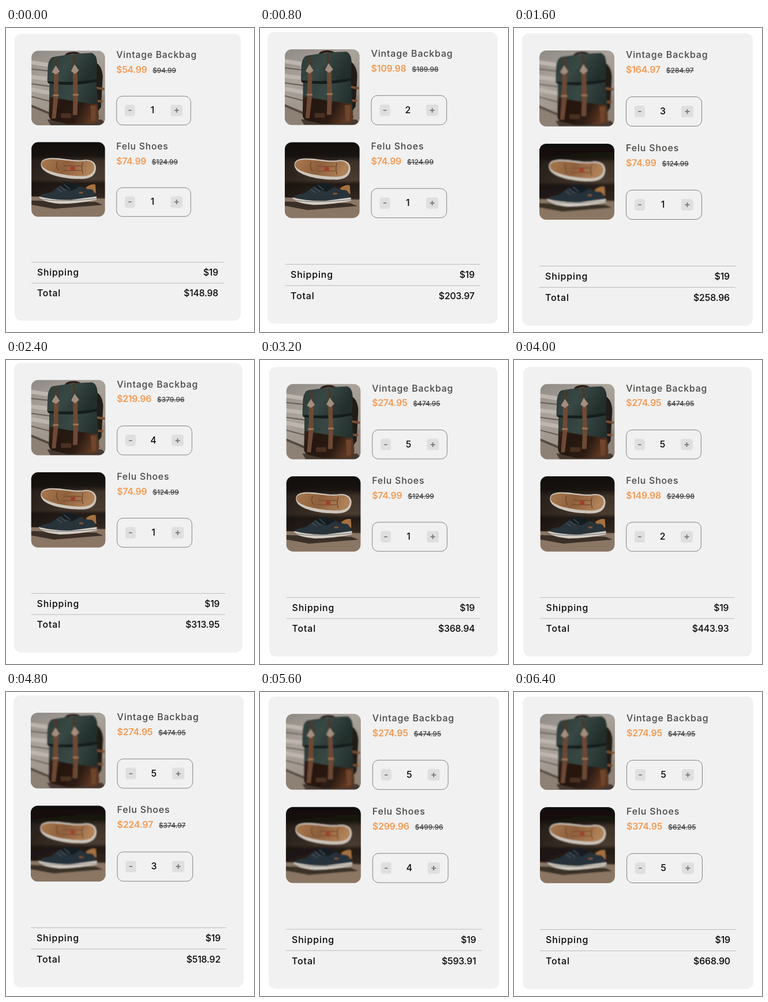
Write an HTML page that moves like this. It is 430x528 px and loops after 7200 ms.

```html
<!DOCTYPE html>
<html lang="en">
<head>
<meta charset="utf-8">
<title>Shopping cart</title>
<style>
html, body { margin: 0; width: 100%; height: 100%; overflow: hidden; background: #fff; }
svg { display: block; width: 100%; height: 100%; }
text { font: 500 16px Inter, "Open Sans", sans-serif; fill: #060606; }
.name { fill: #464644; letter-spacing: .83px; }
.label { letter-spacing: .87px; }
.price { fill: #f59a52; font-weight: 600; letter-spacing: -.25px; }
.old { fill: #3f3f3f; font-size: 12px; font-weight: 500; letter-spacing: 0; text-decoration: line-through; }
.sum { text-anchor: end; letter-spacing: -.2px; }
.qty, .sign { text-anchor: middle; }
.sign { fill: #7c7c7c; font-weight: 700; }
.box { fill: none; stroke: #828282; }
.btn { fill: #dfdfdf; }
.rule { stroke: #bababa; }
</style>
</head>
<body>
<svg viewBox="0 0 430 528">
  <defs>
    <clipPath id="round"><rect width="130" height="132" rx="12"/></clipPath>
    <linearGradient id="wall" x2=".5" y2="1">
      <stop stop-color="#8d8782"/><stop offset=".4" stop-color="#aaa39b"/><stop offset="1" stop-color="#94897e"/>
    </linearGradient>
    <linearGradient id="canvas" x2="1" y2=".4">
      <stop stop-color="#2c3a36"/><stop offset=".5" stop-color="#384844"/><stop offset="1" stop-color="#222e2b"/>
    </linearGradient>
    <linearGradient id="leather" x2="1" y2=".3">
      <stop stop-color="#3a2318"/><stop offset=".3" stop-color="#24170f"/><stop offset=".7" stop-color="#2c1b13"/><stop offset="1" stop-color="#5c3822"/>
    </linearGradient>
    <linearGradient id="dusk" x2="0" y2="1">
      <stop stop-color="#0d0b09"/><stop offset=".2" stop-color="#1a1511"/><stop offset=".27" stop-color="#3d3128"/>
      <stop offset=".5" stop-color="#4a3c31"/><stop offset=".55" stop-color="#231b16"/><stop offset=".72" stop-color="#31261f"/>
      <stop offset=".78" stop-color="#6d5a4a"/><stop offset="1" stop-color="#94806d"/>
    </linearGradient>
    <linearGradient id="shade">
      <stop stop-color="#120e0b" stop-opacity=".55"/><stop offset="1" stop-color="#120e0b" stop-opacity="0"/>
    </linearGradient>
    <linearGradient id="sole" x2="1" y2=".2">
      <stop stop-color="#a97a50"/><stop offset=".5" stop-color="#8d5f3c"/><stop offset="1" stop-color="#b08259"/>
    </linearGradient>
    <filter id="soft" x="-5%" y="-5%" width="110%" height="110%"><feGaussianBlur stdDeviation=".8"/></filter>

    <g id="bag" clip-path="url(#round)"><g filter="url(#soft)">
      <rect x="-4" y="-4" width="138" height="140" fill="url(#wall)"/>
      <path d="M-4 20L34 26M-4 46L30 50M-4 68L34 75" stroke="#bdb6ae" stroke-width="7"/>
      <path d="M-4 32L32 36M-4 58L32 63M-4 80L34 90" stroke="#655d56" stroke-width="2"/>
      <path d="M-4 98L34 113V136H-4Z" fill="#8d8175"/>
      <path d="M-4 96L34 112" stroke="#544a42" stroke-width="4"/>
      <path d="M116 82L134 78V136H112Z" fill="#8f8377"/>
      <path d="M28 122L124 122L134 132H34Z" fill="#453930"/>
      <path d="M112 20Q125 26 126 46L123 100L114 112Z" fill="#211c19"/>
      <path d="M104 64L129 68M106 88L126 90" stroke="#7c4f33" stroke-width="4"/>
      <path d="M60 12Q60 5 71 4Q83 3 87 9" fill="none" stroke="#2e1e17" stroke-width="4"/>
      <path d="M32 44L114 44L119 118Q118 128 109 129L64 130L38 124Q32 122 31 115Z" fill="url(#canvas)"/>
      <path d="M32 82Q74 90 116 95L119 118Q118 128 109 129L64 130L38 124Q32 122 31 115Z" fill="url(#leather)"/>
      <path d="M38 11Q74 5 107 4Q115 7 116 20L115 50Q74 58 28 54L29 27Q31 13 38 11Z" fill="url(#canvas)"/>
      <path d="M28 54Q74 58 115 50V55Q74 64 30 58Z" fill="#151d1b"/>
      <path d="M42 12L46 28M74 8L77 26" stroke="#4d382b" stroke-width="4"/>
      <path d="M40 34H48L47 84L43 120H36L39 82Z" fill="#6d4a36"/>
      <path d="M73 34H81L82 84L81 114H73L74 82Z" fill="#6d4a36"/>
      <path d="M36 38L43 26L50 37L43 42ZM70 36L76 24L84 35L77 41Z" fill="#a48d7d"/>
      <path d="M38 79H48M73 78H83" stroke="#a37654" stroke-width="3"/>
      <path d="M104 97L114 98L113 124L106 126Z" fill="#6f452b"/>
      <rect x="52" y="111" width="18" height="8" rx="1" fill="#4a3023"/>
    </g></g>

    <g id="shoes" clip-path="url(#round)"><g filter="url(#soft)">
      <rect x="-4" y="-4" width="138" height="140" fill="url(#dusk)"/>
      <rect x="-4" y="-4" width="100" height="102" fill="url(#shade)"/>
      <path d="M-4 96L134 100V136H-4Z" fill="#8a7664"/>
      <path d="M-4 103L114 106L126 111L40 118L-4 110Z" fill="#3b3028"/>
      <path d="M17 42C15 31 24 28 38 28C58 28 76 34 94 31C106 30 115 36 114 47C113 59 104 66 84 65C56 65 20 57 17 42Z" fill="#cec6bb"/>
      <path d="M18 40C17 32 26 30 38 30C58 31 77 36 94 33C105 32 112 38 111 46C110 56 101 61 84 60C58 59 20 52 18 40Z" fill="url(#sole)"/>
      <path d="M46 34Q42 42 48 50M91 36Q87 45 91 56" fill="none" stroke="#704628" stroke-width="1.5"/>
      <path d="M57 42H88M56 50H88" stroke="#7b4e30" stroke-width="1.5"/>
      <rect x="69" y="43" width="8" height="7" fill="#a04030"/>
      <path d="M96 80Q106 73 113 75L114 90L100 88Z" fill="#a5703f"/>
      <path d="M14 97Q17 91 34 89L50 77Q58 69 74 72L86 78Q98 84 104 83Q112 84 114 99L50 105Q18 104 14 97Z" fill="#28333a"/>
      <path d="M50 77Q58 69 74 72L86 78L72 86L58 82Z" fill="#161d20"/>
      <path d="M45 82L54 88M51 78L61 86M58 75L68 83" stroke="#4d5a5f" stroke-width="1.2"/>
      <path d="M13 96Q40 103 70 102L115 96V102Q80 109 50 109Q16 106 13 96Z" fill="#d3cdc4"/>
      <path d="M14 100Q44 107 115 100" fill="none" stroke="#555" stroke-width=".8"/>
      <rect x="84" y="88" width="7" height="3" fill="#7e5535"/>
    </g></g>
  </defs>

  <g id="card">
    <rect width="400" height="508" rx="12" fill="#f1f1f1"/>
    <g id="items"></g>
    <path class="rule" d="M30 404.5H370M30 441.5H370"/>
    <text class="label" x="40" y="428">Shipping</text>
    <text class="sum" x="360" y="428">$19</text>
    <text class="label" x="40" y="465">Total</text>
    <text class="sum" id="total" x="360" y="465"></text>
  </g>
</svg>
<script>
const STEP = 800, SHIPPING = 19, MAX = 5;
const items = [
  { name: "Vintage Backbag", art: "bag", price: 54.99, old: 94.99 },
  { name: "Felu Shoes", art: "shoes", price: 74.99, old: 124.99 }
];
// Card offset and scale at each step
const poses = [
  [14.7, 10, .981], [13.1, 7.1, .997], [14, 9, 1],
  [14, 5, .99], [16, 12, .99], [16, 12, .99],
  [13, 6, .9975], [15, 8, .999], [15, 8, 1]
];
const $ = id => document.getElementById(id);
const money = n => "$" + n.toFixed(2);

$("items").innerHTML = items.map((item, i) => `
  <g transform="translate(0 ${i * 162})">
    <use href="#${item.art}" x="30" y="30"/>
    <text class="name" x="180" y="43">${item.name}</text>
    <text x="180" y="69"><tspan class="price" id="price${i}"></tspan><tspan class="old" id="old${i}" dx="10"></tspan></text>
    <rect class="box" x="180.5" y="110.5" width="131" height="51" rx="10.5"/>
    <rect class="btn" x="195" y="126" width="18" height="20" rx="4"/>
    <rect class="btn" x="276" y="126" width="21" height="20" rx="4"/>
    <text class="sign" x="204" y="141">-</text>
    <text class="sign" x="286.5" y="141">+</text>
    <text class="qty" id="qty${i}" x="244" y="141"></text>
  </g>`).join("");

function draw(step) {
  const [x, y, s] = poses[step];
  const counts = [Math.min(step + 1, MAX), Math.max(1, step - MAX + 2)];
  let total = SHIPPING;
  items.forEach((item, i) => {
    const n = counts[i];
    total += item.price * n;
    $("price" + i).textContent = money(item.price * n);
    $("old" + i).textContent = money(item.old * n);
    $("qty" + i).textContent = n;
  });
  $("total").textContent = money(total);
  $("card").setAttribute("transform", `translate(${x} ${y}) scale(${s})`);
}

let shown = -1;
const start = performance.now();
function tick() {
  const step = Math.floor((performance.now() - start) / STEP) % poses.length;
  if (step !== shown) draw(shown = step);
  requestAnimationFrame(tick);
}
tick();
</script>
</body>
</html>
```
